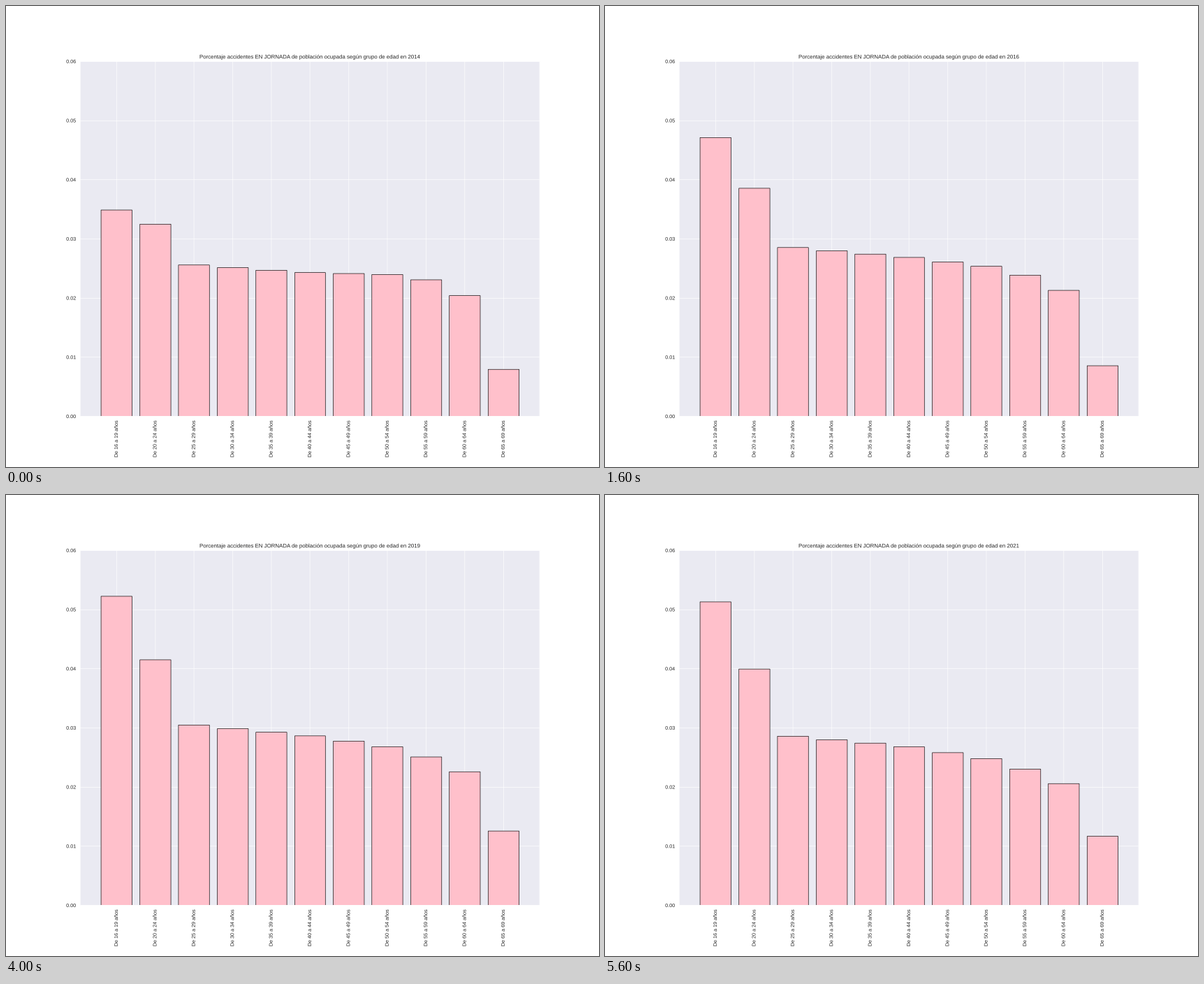
A matplotlib script for the animation above (6400 ms loop, 849 by 660 pixels).

```python
import math
import matplotlib.pyplot as plt
import numpy as np
from matplotlib.animation import FuncAnimation
from matplotlib.patches import PathPatch, Rectangle
from matplotlib.textpath import TextPath
from matplotlib.transforms import Affine2D

W, H, DPI = 849, 660, 48
SHEET_W, SHEET_H = 1800, 1400    # the chart is laid out on an 18 x 14 inch sheet
PT = 100 / 72                    # one point in sheet units
LINE = W / 18 / DPI              # a one point line on the stage
LEFT, RIGHT, BOTTOM, TOP = 225, 1620, 154, 1232
INK = "#262626"
TITLE = ("Porcentaje accidentes EN JORNADA de población ocupada "
         "según grupo de edad en {}")

plt.rcParams["font.family"] = "Liberation Sans"

YEARS = range(2014, 2022)
AGES = ["De 16 a 19 años"] + [f"De {a} a {a + 4} años" for a in range(20, 70, 5)]

# accidents per 10,000: a yearly level, plus an age effect that drifts over time
KEY_YEARS = [2014, 2016, 2018, 2019, 2020, 2021]
LEVEL = [241, 260, 267, 276, 227, 256.5]
DRIFT = [0, 0.74, 0.92, 0.99, 0.86, 1.06]


def rates(year):
    k = np.arange(len(AGES))
    level = np.interp(year, KEY_YEARS, LEVEL)
    drift = np.interp(year, KEY_YEARS, DRIFT)
    start = np.interp(k, [0, 1, 2, 5, 7, 8, 9], [108, 84, 15, 2, -1, -10, -37])
    change = np.interp(k, [0, 1, 2, 5, 8, 9], [140, 56, 14, 9, -15, -13])
    values = level + start + drift * change
    # the oldest group eases from a third of the level to nearly half
    t = np.clip((year - 2016) / 3, 0, 1)
    values[-1] = level * (0.33 + 0.125 * t * t * (3 - 2 * t))
    return values


def snap_x(x):
    return math.floor(x + 0.5) + 0.5


def snap_y(y):
    return math.ceil(y - 0.5) - 0.5


def x_at(k):
    return LEFT + (k + 0.94) * (RIGHT - LEFT) / 11.88


def y_at(rate):
    return BOTTOM + rate / 600 * (TOP - BOTTOM)


def text_path(text, x, y, points, align=0.5, turn=0):
    path = TextPath((0, 0), text, size=points * PT)
    box = path.get_extents()
    move = Affine2D().translate(-box.x0 - align * box.width, 0)
    return path.transformed(move.rotate_deg(turn).translate(x, y))


def write(*args, **kw):
    patch = PathPatch(text_path(*args, **kw), facecolor=INK, linewidth=0)
    return ax.add_patch(patch)


def line(xs, ys, width, z):
    ax.plot(xs, ys, color="white", linewidth=width * LINE, zorder=z,
            solid_capstyle="butt", snap=False)


fig = plt.figure(figsize=(W / DPI, H / DPI), dpi=DPI, facecolor="white")
ax = fig.add_axes([0, 0, 1, 1])
ax.axis("off")

panel = ax.add_patch(Rectangle((LEFT, BOTTOM), RIGHT - LEFT, TOP - BOTTOM,
                               facecolor="#EAEAF2", linewidth=0, snap=False, zorder=0))

for n in range(7):
    y = y_at(n * 100)
    line([LEFT, RIGHT], [snap_y(y)] * 2, 1, 0.5)
    write(f"{n / 100:.2f}", LEFT - 9.5 * PT, y - 5.5, 11, align=1)

bars = []
for k, age in enumerate(AGES):
    x = x_at(k)
    line([snap_x(x)] * 2, [BOTTOM, TOP], 1, 0.5)
    write(age, x + 4, BOTTOM - 9.5 * PT, 11, align=1, turn=90)
    x0, x1 = snap_x(x_at(k - 0.4)), snap_x(x_at(k + 0.4))
    bar = Rectangle((x0, snap_y(BOTTOM)), x1 - x0, 0, facecolor="pink",
                    edgecolor="black", linewidth=LINE, snap=False)
    ax.add_patch(bar)
    bar.set_clip_path(panel)
    bars.append(bar)

for x in (LEFT, RIGHT):
    line([x, x], [BOTTOM, TOP], 1.25, 2.5)
for y in (BOTTOM, TOP):
    line([LEFT, RIGHT], [y, y], 1.25, 2.5)

title_spot = ((LEFT + RIGHT) / 2, TOP + 6 * PT, 12)
title = write(TITLE.format(YEARS[0]), *title_spot)

ax.set_xlim(0, SHEET_W)
ax.set_ylim(0, SHEET_H)


def draw(i):
    for bar, rate in zip(bars, rates(YEARS[i])):
        bar.set_height(snap_y(y_at(rate)) - bar.get_y())
    title.set_path(text_path(TITLE.format(YEARS[i]), *title_spot))
    return [*bars, title]


anim = FuncAnimation(fig, draw, frames=len(YEARS), interval=800,
                     repeat=True, repeat_delay=0, blit=False)
plt.show()
```
